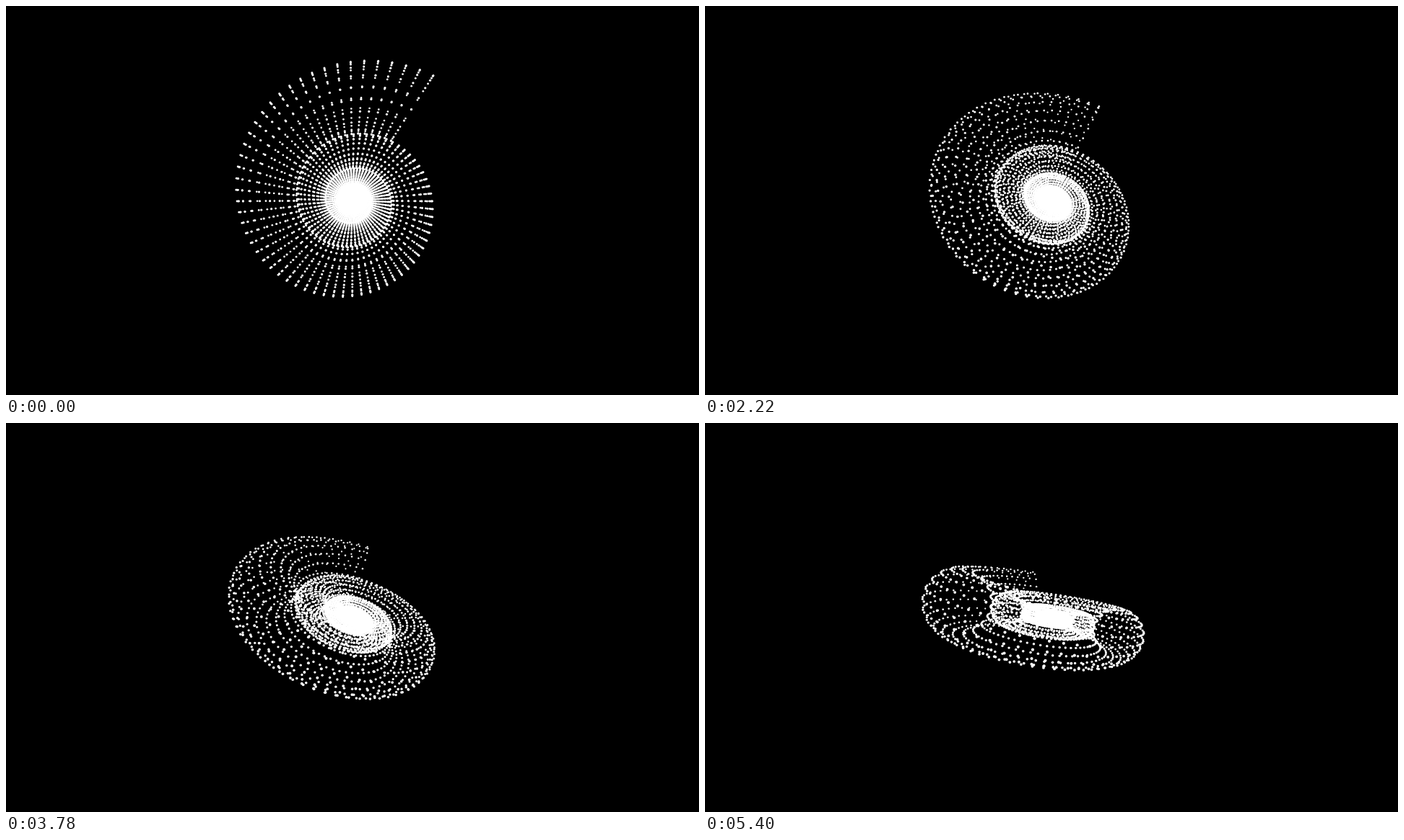
Recreate the animation shown at these times as an HTML page with a canvas. Size 960 px wide and 540 px high, loop 5430 ms.

```html
<!DOCTYPE html>
<html lang="en">
<head>
<meta charset="utf-8">
<title>Spiral shell</title>
<style>
  html, body { margin: 0; width: 100%; height: 100%; overflow: hidden; background: #000; }
  canvas { display: block; width: 960px; height: 540px; }
</style>
</head>
<body>
<canvas id="stage" width="960" height="540"></canvas>
<script>
const LOOP = 5430, STEP = 60;
const CX = 480, CY = 270;
const EYE = 270 / Math.tan(Math.PI / 6);
const RINGS = 400, PER_RING = 20;
const RING_STEP = 0.0977, END_ANGLE = 0.998;
const GROWTH = 0.1155, RADIUS = 150.5, TUBE = 51.5;
const TILT_X = 0.0147, TILT_Y = 0.0098;
const DOT = 1.45;

const ctx = document.getElementById('stage').getContext('2d');

// Logarithmic spiral tube, listed from its open mouth inwards; y points up.
const points = [];
for (let i = 0; i < RINGS; i++) {
  const turn = i * RING_STEP;
  const angle = END_ANGLE + turn;
  const size = Math.exp(-GROWTH * turn);
  for (let j = 0; j < PER_RING; j++) {
    const phi = j * 2 * Math.PI / PER_RING;
    const r = size * (RADIUS + TUBE * Math.cos(phi));
    points.push([r * Math.cos(angle), r * Math.sin(angle), -size * TUBE * Math.sin(phi)]);
  }
}

function draw(n) {
  const ca = Math.cos(n * TILT_X), sa = Math.sin(n * TILT_X);
  const cb = Math.cos(n * TILT_Y), sb = Math.sin(n * TILT_Y);
  ctx.fillStyle = '#000';
  ctx.fillRect(0, 0, 960, 540);
  ctx.fillStyle = '#fff';
  for (const [x, y, z] of points) {
    const up = y * ca - z * sa;
    const far = y * sa + z * ca;
    const across = x * cb - far * sb;
    const depth = x * sb + far * cb;
    const s = EYE / (EYE + depth);
    ctx.beginPath();
    ctx.arc(CX + across * s, CY - up * s, DOT * s, 0, 2 * Math.PI);
    ctx.fill();
  }
}

const start = performance.now();
let shown = -1;

function tick() {
  const n = Math.floor((performance.now() - start) % LOOP / STEP);
  if (n !== shown) draw(shown = n);
  requestAnimationFrame(tick);
}
tick();
</script>
</body>
</html>
```
